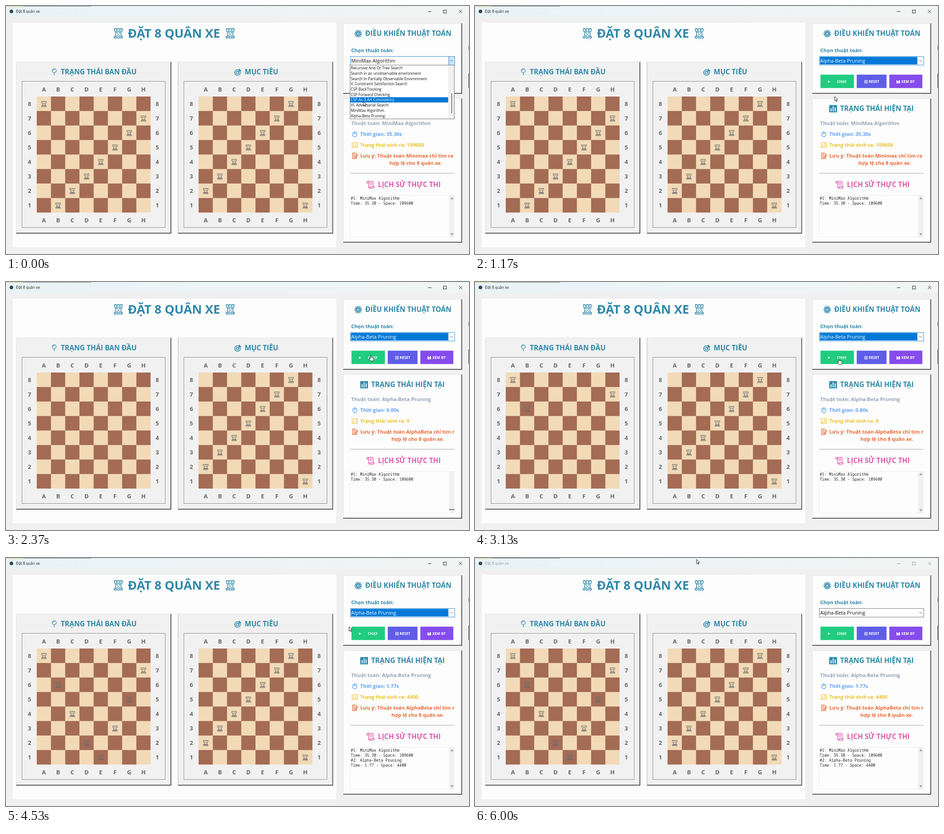
Recreate the animation shown at these times as an HTML page with a canvas. Size 1022 by 548 pixels, loop 6.03 s.

```html
<!DOCTYPE html>
<html lang="vi">
<head>
<meta charset="utf-8">
<title>Đặt 8 quân xe</title>
<style>
html, body { margin: 0; width: 100%; height: 100%; overflow: hidden; background: #f0f0f0; }
canvas { display: block; }
</style>
</head>
<body>
<canvas id="stage" width="1022" height="548"></canvas>
<script>
const c = document.getElementById('stage').getContext('2d');
const LOOP = 6030, POPUP_CLOSE = 740, RUN = 2270, STEP = 255, BLUR = 5650;
const SANS = '"Open Sans", "Noto Sans", sans-serif', MONO = '"Noto Sans Mono", monospace';
const TEAL = '#3088aa', BLUE = '#0078d7';
const GOAL = 'G8 F7 E6 D5 C4 B3 A2 H1'.split(' ');
const OLD = 'A8 H7 G6 F5 E4 D3 C2 B1'.split(' ');
const FOUND = 'A8 H7 B6 G5 C4 F3 D2 E1'.split(' ');
const ITEMS = ['Recursive And Or Tree Search', 'Search in an unobservable environment',
  'Search In Partially Observable Environment', 'V. Constraint Satisfaction Search', 'CSP BackTracking',
  'CSP Forward Checking', 'CSP Ac-3 Art Concistency', 'VI. Adversarial Search', 'MiniMax Algorithm', 'Alpha-Beta Pruning'];
// time, x, y of the pointer's hot spot
const POINTER = [[0, 789, 211], [330, 783, 235], [560, 784, 242], [740, 784, 242], [1100, 794, 200], [1300, 794, 200],
  [1800, 805, 162], [2500, 805, 162], [3800, 802, 178], [4350, 802, 178], [5100, 497, 0], [5350, 497, 0],
  [5600, 494, -14], [5800, 492, -14], [5980, 489, 3], [LOOP, 489, 3]];

function rect(x, y, w, h, fill) { c.fillStyle = fill; c.fillRect(x, y, w, h); }
function box(x, y, w, h, color) { c.strokeStyle = color; c.lineWidth = 1; c.strokeRect(x + .5, y + .5, w - 1, h - 1); }

// y is the middle of the capitals
function text(s, x, y, size, color, bold = true, align = 'left', family = SANS) {
  c.font = `${bold ? 700 : 400} ${size}px ${family}`;
  c.textAlign = align;
  c.fillStyle = color;
  c.fillText(s, x, y + size * .357);
}
const heading = (s, x, y, color = TEAL) => text(s, x, y, 15.3, color);

function path(d, x, y, scale, stroke, width = 1, fill) {
  const p = new Path2D(d);
  c.save();
  c.translate(x, y);
  c.scale(scale, scale);
  if (fill) { c.fillStyle = fill; c.fill(p); }
  if (stroke) { c.strokeStyle = stroke; c.lineWidth = width; c.lineJoin = 'round'; c.stroke(p); }
  c.restore();
}
function ring(x, y, r, color, width = 1.3) {
  c.beginPath();
  c.arc(x, y, r, 0, 7);
  c.strokeStyle = color;
  c.lineWidth = width;
  c.stroke();
}

function raised(x, y, w, h, fill) {
  rect(x, y, w, h, '#606060');
  rect(x, y, w - 1, h - 1, '#e3e3ec');
  rect(x + 1, y + 1, w - 2, h - 2, '#555');
  rect(x + 1, y + 1, w - 3, h - 3, fill);
}
function groove(x, y, w, h) {
  box(x + 1, y + 1, w - 1, h - 1, '#fff');
  box(x, y, w - 1, h - 1, '#808080');
}

const ROOK = 'M-5.3-6H-3.2V-4.6H-1.2V-6H1.2V-4.6H3.2V-6H5.3V-2.7L3.3-1.6V2.4L4.3 3.5V4H-4.3V3.5L-3.3 2.4V-1.6L-5.3-2.7Z M-3.3-1.6H3.3 M-3.3 2.4H3.3 M-5.3 4H5.3V6H-5.3Z';
const TOWER = 'M-8.5-10.5H-5V-8.5H-2V-10.5H2V-8.5H5V-10.5H8.5V-5L6-3.5V5L8 7.5H-8L-6 5V-3.5L-8.5-5Z M-6-3.5H6 M-9 7.5H9V10.5H-9Z M-4-.7H-1 M1.5-.7H4.5 M-2 2.2H2 M-4.5 5H-1 M1.5 5H4.5 M-5-6H-1 M1.5-6H5';

function board(x, rooks) {
  raised(x - 46, 123, 343, 380, '#f1f1f1');
  groove(x - 33, 166, 318, 325);
  const x0 = x - .1, w = 31.4, h = 32.05;
  rect(x0, 200, 8 * w, 8 * h, '#f2dab7');
  for (let i = 0; i < 8; i++) {
    const cx = x0 + (i + .5) * w, cy = 200 + (i + .5) * h;
    for (const y of [184, 473]) text('ABCDEFGH'[i], cx, y, 12.8, '#666', true, 'center');
    for (const lx of [x - 16, x + 266]) text(8 - i, lx, cy + .5, 12.8, '#666', true, 'center');
    for (let j = 1 - i % 2; j < 8; j += 2) rect(x0 + j * w, 200 + i * h, w, h, '#a46b55');
  }
  for (const r of rooks)
    path(ROOK, x0 + ('ABCDEFGH'.indexOf(r[0]) + .5) * w, 200 + (8.5 - r[1]) * h + .5, 1, '#6b6b6b', 1);
}

function icons() {
  for (const x of [248, 495]) path(TOWER, x, 60.3, 1, TEAL, 1.5);
  // pin
  ring(106.5, 143, 4.3, TEAL);
  path('M0 4.5V10 M-2-.5A2 2 0 0 1 0-2.3', 106.5, 143, 1, TEAL, 1.3);
  // target
  ring(511, 147, 6.3, TEAL, 1.6);
  ring(511, 147, 3, TEAL, 1.5);
  path('M0 0L5-5 M4-8V-4H8L5.5-5.5Z', 511, 147, 1, TEAL, 1.4);
  // gear
  for (let i = 0; i < 8; i++)
    ring(777.5 + 5.8 * Math.cos(i * Math.PI / 4), 61 + 5.8 * Math.sin(i * Math.PI / 4), 2, TEAL, 1.1);
  ring(777.5, 61, 4.8, TEAL, 1.2);
  ring(777.5, 61, 2.3, TEAL, 1.2);
  // chart
  rect(782, 219, 17, 16, TEAL);
  rect(785, 226, 2, 7, '#fff');
  rect(789.5, 221.5, 2, 11.5, '#fff');
  rect(794, 224, 2, 9, '#fff');
  // stopwatch
  ring(770, 284.3, 4.6, '#60a5fa', 1.5);
  path('M0 0V-3 M-2-6.3H2 M4-4L5.3-5.3 M-4-4L-5.3-5.3', 770, 284.3, 1, '#60a5fa', 1.4);
  // numbers
  path('M-6-5.5H6V5.5H-6Z M-3-3.5V-.8 M1-3.3H3V-1H1 M-4 1.2H-2V3.6H-4 M1 1.2V2.5H3.3 M3 1V4', 770, 307.3, 1, '#ecc02f', 1.1);
  // memo
  path('M4 2V6H-5V-6H1L4-3 M-3-3H0 M-3 0H0 M-3 3H-1 M0 4L1 1L5-3L6.5-1.5L2.5 3Z', 770, 331, 1, '#ea6a35', 1.3);
  // scroll
  path('M-4 5V-5.5Q-4-7.5-6-7.5Q-8-7.5-8-5.5V-4H-4 M-6-7.5H4Q6-7.5 6-5V4 M-4 5Q-4 7.5-1.5 7.5H6Q8 7.5 8 5V4H-1V5.5Q-1 7.5-2.5 7.5 M-1.5-4H3.5 M-1.5-1H3.5', 804.5, 395, 1, '#e15bad', 1.4);
}

function button(x, w, color, label, labelX) {
  rect(x - .4, 151.7, w + .8, 29.6, color);
  text(label, labelX, 167, 8, '#fff');
}

function controls(open, blurred) {
  raised(744, 38, 263, 156, '#fdfdfd');
  heading('ĐIỀU KHIỂN THUẬT TOÁN', 793, 61);
  text('Chọn thuật toán:', 762, 98, 11.1, TEAL);
  rect(760, 111, 231, 20, '#fff');
  if (!open && !blurred) rect(761.5, 112.5, 215, 16.5, BLUE);
  if (open) {
    rect(977, 111, 14, 20, '#cce4f7');
    box(977, 111, 14, 20, BLUE);
  }
  box(760, 111, 231, 20, blurred ? '#7a7a7a' : '#3b8fd4');
  text(open ? 'MiniMax Algorithm' : 'Alpha-Beta Pruning', 762, 121.3, 11, open || blurred ? '#111' : '#fff', false);
  path('M-3-1.5L0 1.5L3-1.5', 983.5, 121, 1, '#555', 1);

  button(763, 73, '#20cc80', 'CHẠY', 799);
  button(843, 65, '#5f5de8', 'RESET', 869);
  button(915, 72, '#864bec', 'XEM ĐT', 941);
  path('M-2-2.5L3 0L-2 2.5Z', 781, 167.3, 1, null, 0, '#fff');
  path('M-3-3H3V3H-3Z M-1.5 1V-1H1.5 M0 1.5H1.5V0', 863, 167.3, 1, '#fff', 1);
  rect(930.5, 164, 7.5, 7, '#fff');
  rect(932.5, 164, 3, 2.2, '#864bec');
  rect(933, 168.3, 2.5, 1.6, '#864bec');
}

function status(t, k) {
  const run = t >= RUN, done = k === 8;
  const time = !run ? '35.30' : Math.min(1.77, k * .2667).toFixed(2);
  raised(744, 204, 263, 319, '#fdfdfd');
  heading('TRẠNG THÁI HIỆN TẠI', 806, 227);
  text('Thuật toán: ' + (run ? 'Alpha-Beta Pruning' : 'MiniMax Algorithm'), 762, 259.3, 11.2, '#97a4b6');
  text(`Thời gian: ${time}s`, 782, 283.3, 11.2, '#60a0f5');
  text('Trạng thái sinh ra: ' + (!run ? 109600 : done ? 4400 : 0), 782, 307.3, 11.1, '#ecc02f');
  c.save();
  c.beginPath();
  c.rect(760, 320, 230, 40);
  c.clip();
  text(`Lưu ý: Thuật toán ${run ? 'AlphaBeta' : 'Minimax'} chỉ tìm ra`, 782, 331.3, 11.1, '#ea6a35');
  text('hợp lệ cho 8 quân xe.', run ? 909 : 904.5, 346.8, 11.1, '#ea6a35', true, 'center');
  c.restore();
  rect(760, 369, 230, 1, '#a3a3a3');

  heading('LỊCH SỬ THỰC THI', 821, 395, '#e15bad');
  box(759, 418, 231, 93, '#efeeea');
  rect(978, 418, 12, 92, '#f0f0f0');
  if (t > 2340 && t < 2410) rect(978, 502, 12, 1.5, '#555');
  else {
    path('M-3.5 2.5L0-2.5L3.5 2.5Z', 984.3, 424.5, 1, null, 0, '#a3a3a3');
    path('M-3.5-2.5L0 2.5L3.5-2.5Z', 984.3, 504.5, 1, null, 0, '#a3a3a3');
  }
  const log = ['#1: MiniMax Algorithm', 'Time: 35.30 - Space: 109600'];
  if (done) log.push('#2: Alpha-Beta Pruning', 'Time: 1.77 - Space: 4400');
  log.forEach((s, i) => text(s, 761, 425 + i * 10.9, 8.52, '#222', false, 'left', MONO));
}

function popup(y) {
  const row = Math.max(0, Math.min(9, Math.floor((y - 131.2) / 11.7)));
  rect(759, 130, 231, 120, '#fff');
  box(759, 130, 231, 120, '#777');
  rect(976, 131, 13, 118, '#f0f0f0');
  rect(983, 193, 1.5, 44, '#666');
  rect(760, 131.3 + row * 11.7, 216, 11.7, BLUE);
  ITEMS.forEach((s, i) => text(s, 761, 137.3 + i * 11.7, 8.35, i === row ? '#fff' : '#111', false));
}

function frame(blurred) {
  rect(0, 0, 1022, 548, '#f0f0f0');
  const bar = c.createLinearGradient(0, 0, 1022, 0);
  bar.addColorStop(0, '#e8f3f7');
  bar.addColorStop(1, '#f1f5f3');
  rect(0, 0, 1022, 24, bar);
  rect(0, 0, 38, 1, '#d8c66a');
  rect(38, 0, 150, 1, '#777');
  rect(1021, 88, 1, 9, '#555');
  rect(1021, 149, 1, 32, '#222');
  c.beginPath();
  c.arc(12, 12, 4, 0, 7);
  c.fillStyle = '#33475a';
  c.fill();
  const ink = blurred ? '#999' : '#222';
  text('Đặt 8 quân xe', 22, 12.3, 8.2, ink, false);
  path('M931.5 12.5H939', 0, 0, 1, ink);
  box(965, 8.5, 7.5, 7.5, ink);
  path('M-3.5-3.5L3.5 3.5M3.5-3.5L-3.5 3.5', 1003.3, 12.3, 1, ink);
}

function pointerAt(t) {
  const i = POINTER.findIndex(p => p[0] > t);
  const [t0, x0, y0] = POINTER[i - 1], [t1, x1, y1] = POINTER[i];
  const u = (t - t0) / (t1 - t0), e = u * u * (3 - 2 * u);
  return [x0 + (x1 - x0) * e, y0 + (y1 - y0) * e];
}
function drawPointer(x, y, open) {
  const hand = !open && y >= 152 && y < 181 && x >= 763 && x < 987;
  const shape = hand
    ? 'M-1 .8Q0-.6 1 .8V4.5Q2 3.6 3 4.8Q4.2 4 5 5.3Q6.5 4.8 6.5 6.5V9L5.5 12.5H-.2L-3.2 8.5Q-3.6 6.5-1 7.5Z'
    : 'M0 0V9.6L2.2 7.6L3.8 11L5.3 10.3L3.8 7H6.8Z';
  path(shape, x, y, 1, '#222', 1, '#fff');
}

function draw(t) {
  const open = t < POPUP_CLOSE, blurred = t >= BLUR;
  const k = Math.max(0, Math.min(8, Math.floor((t - RUN) / STEP)));
  const [x, y] = pointerAt(t);
  frame(blurred);
  rect(15, 37, 714, 496, '#fdfdfd');
  text('ĐẶT 8 QUÂN XE', 269, 60, 27, TEAL);
  board(68, t < RUN ? OLD : FOUND.slice(0, k));
  board(425.2, GOAL);
  heading('TRẠNG THÁI BAN ĐẦU', 121, 146);
  heading('MỤC TIÊU', 527, 146);
  controls(open, blurred);
  status(t, k);
  icons();
  if (open) popup(y);
  drawPointer(x, y, open);
}

const start = performance.now();
function tick() {
  draw((performance.now() - start) % LOOP);
  requestAnimationFrame(tick);
}
tick();
</script>
</body>
</html>
```
